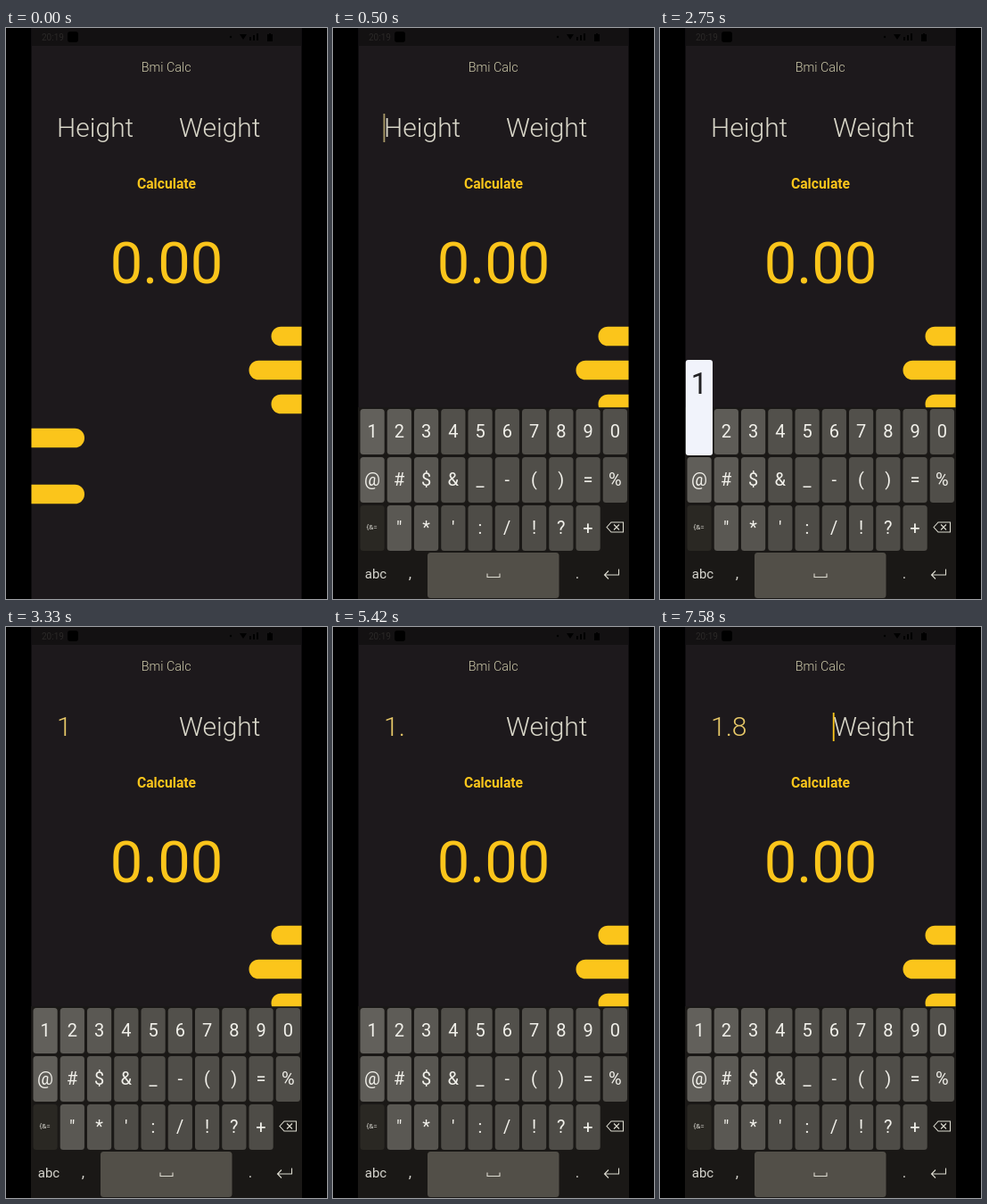
Recreate the animation shown at these times as an HTML page. Size 360 by 640 pixels, loop 8 s.

```html
<!DOCTYPE html>
<html lang="en">
<head>
<meta charset="utf-8">
<title>Bmi Calc</title>
<style>
  html, body { margin: 0; width: 100%; height: 100%; overflow: hidden; background: #000; }
  svg { display: block; width: 360px; height: 640px; font-family: Roboto, sans-serif; }
  .mid { text-anchor: middle; }
  .field { font-size: 30px; font-weight: 300; fill: #d8d6c8; }
  .typed { fill: #e8c968; }
  .gold { fill: #fbc51b; }
  .icon { fill: none; stroke: #dcdbd0; stroke-width: 1.1; }
</style>
</head>
<body>
<svg id="stage" viewBox="0 0 360 640">
  <defs>
    <clipPath id="phone"><rect x="28.5" width="303" height="640"/></clipPath>
  </defs>
  <rect width="360" height="640" fill="#000"/>
  <g clip-path="url(#phone)">
    <rect x="28" width="304" height="640" fill="#1d191c"/>
    <rect x="28" width="304" height="20" fill="#131112"/>
    <text x="40" y="14" font-size="10" fill="#2b2928">20:19</text>
    <g fill="#000">
      <rect x="69" y="4" width="12" height="12" rx="3"/>
      <circle cx="252" cy="10" r="1.2"/>
      <path d="M262 7h8l-4 6zM273 14v-4h2v4zM277 14v-6h2v6zM281 14v-8h2v8z"/>
      <path d="M293 7h2v-1h2v1h2v8h-6z"/>
    </g>
    <text class="mid" x="179.7" y="49" font-size="14.4" font-weight="300" fill="#cbc7a8">Bmi Calc</text>
    <text class="mid gold" x="180" y="179.5" font-size="15.7" font-weight="700">Calculate</text>
    <text class="mid gold" x="180" y="286" font-size="65">0.00</text>
    <g id="fields"></g>
    <g id="pills" class="gold"></g>
    <rect id="fold" x="28" y="425.5" width="304" height="215" fill="#1b1919"/>
    <g id="keyboard"></g>
    <g id="popups"></g>
  </g>
</svg>
<script>
const LOOP = 8000;
const $ = id => document.getElementById(id);

function add(parent, tag, attrs, text) {
  const el = document.createElementNS('http://www.w3.org/2000/svg', tag);
  for (const k in attrs) el.setAttribute(k, attrs[k]);
  if (text) el.textContent = text;
  parent.appendChild(el);
  return el;
}

// Each step is [time, style]; a style holds until the next step.
function play(el, steps) {
  const frames = steps.map(([t, style]) => ({ offset: t / LOOP, easing: 'step-end', ...style }));
  frames.push({ ...steps[steps.length - 1][1], offset: 1 });
  el.animate(frames, { duration: LOOP, iterations: Infinity }).startTime = 0;
}

function show(el, spans) {
  const steps = spans[0][0] > 0 ? [[0, { opacity: 0 }]] : [];
  for (const [from, to] of spans) {
    steps.push([from, { opacity: 1 }]);
    if (to < LOOP) steps.push([to, { opacity: 0 }]);
  }
  play(el, steps);
}

// Fields
const fields = $('fields');
add(fields, 'text', { class: 'field', x: 194, y: 122 }, 'Weight');
show(add(fields, 'text', { class: 'field', x: 57, y: 122 }, 'Height'), [[0, 2830]]);
for (const [value, from, to] of [['1', 2830, 4000], ['1.', 4000, 5830], ['1.8', 5830, LOOP]])
  show(add(fields, 'text', { class: 'field typed', x: 57, y: 122 }, value), [[from, to]]);

function cursor(x, fill, spans) {
  show(add(fields, 'rect', { x, y: 96, width: 1.8, height: 32, fill }), spans);
}
cursor(56.5, '#a99a68', [[170, 670], [1250, 1750], [2170, 2750]]);
cursor(73.5, '#d6ae3c', [[2830, 3330], [3830, 4000]]);
cursor(80.3, '#d6ae3c', [[4000, 4500], [4920, 5420]]);
cursor(96.5, '#d6ae3c', [[5830, 6330]]);
cursor(193.8, '#fbc51b', [[6500, 7000], [7500, LOOP]]);

// Pills run off the screen edges
for (const [x, y] of [[297.5, 334.7], [272.5, 372.7], [297.5, 410.7], [0, 448.7], [0, 511.7]])
  add($('pills'), 'rect', { x, y, width: x ? 100 : 88, height: 21.6, rx: 10.8 });

// Keyboard
const board = $('keyboard');
const rows = ['1234567890', '@#$&_-()=%', ' "*\':/!?+'];
const keyX = col => 44 + col * 30.25;

add(board, 'rect', { x: 28, y: 425.5, width: 304, height: 260, fill: '#1a1816' });
rows.forEach((row, r) => [...row].forEach((ch, c) => {
  const x = keyX(c), y = 427 + r * 54;
  const l = ch === ' ' ? 42 : (c < 3 ? 98 - c * 4 : 82) - r * 2;
  add(board, 'rect', { x: x - 13.5, y, width: 27.2, height: 51, rx: 3.5, fill: `rgb(${l},${l - 2},${l - 7})` });
  add(board, 'text', { class: 'mid', x, y: y + 32, 'font-size': 20, fill: '#f1f0ea' }, ch);
}));
add(board, 'rect', { x: 106, y: 588, width: 147.5, height: 51, rx: 3.5, fill: '#524f48' });
for (const [s, x, y, size] of [['{&=', 43.5, 562, 8], ['abc', 48, 617, 15], [',', 86.5, 617, 17], ['.', 274, 617, 17]])
  add(board, 'text', { class: 'mid', x, y, 'font-size': size, fill: '#d6d5ce' }, s);
add(board, 'path', {
  class: 'icon',
  d: 'M307 559.5l5-5.5h13.5v11H312zM315 556.5l6 6m0-6l-6 6M173 611.5v4h14v-4M320.5 606.5v6.5h-16m4.5-4.5l-4.5 4.5 4.5 4.5'
});

play(board, [
  [0, { opacity: 0, transform: 'translateY(41px)' }],
  [330, { opacity: 0.68, transform: 'translateY(41px)' }],
  [420, { opacity: 0.9, transform: 'translateY(12px)' }],
  [500, { opacity: 1, transform: 'translateY(0px)' }]
]);
show($('fold'), [[330, LOOP]]);

// Pressed key previews
for (const [ch, x, y, from, to] of [
  ['1', keyX(0), 372, 2750, 2920],
  ['.', 274, 533, 3920, 4080],
  ['8', keyX(7), 372, 5750, 5920]
]) {
  const g = add($('popups'), 'g', {});
  add(g, 'rect', { x: x - 15.2, y, width: 30.2, height: 107, rx: 3, fill: '#f1f3fb' });
  add(g, 'text', { class: 'mid', x, y: y + 38, 'font-size': 33, fill: '#222124' }, ch);
  show(g, [[from, to]]);
}
</script>
</body>
</html>
```
